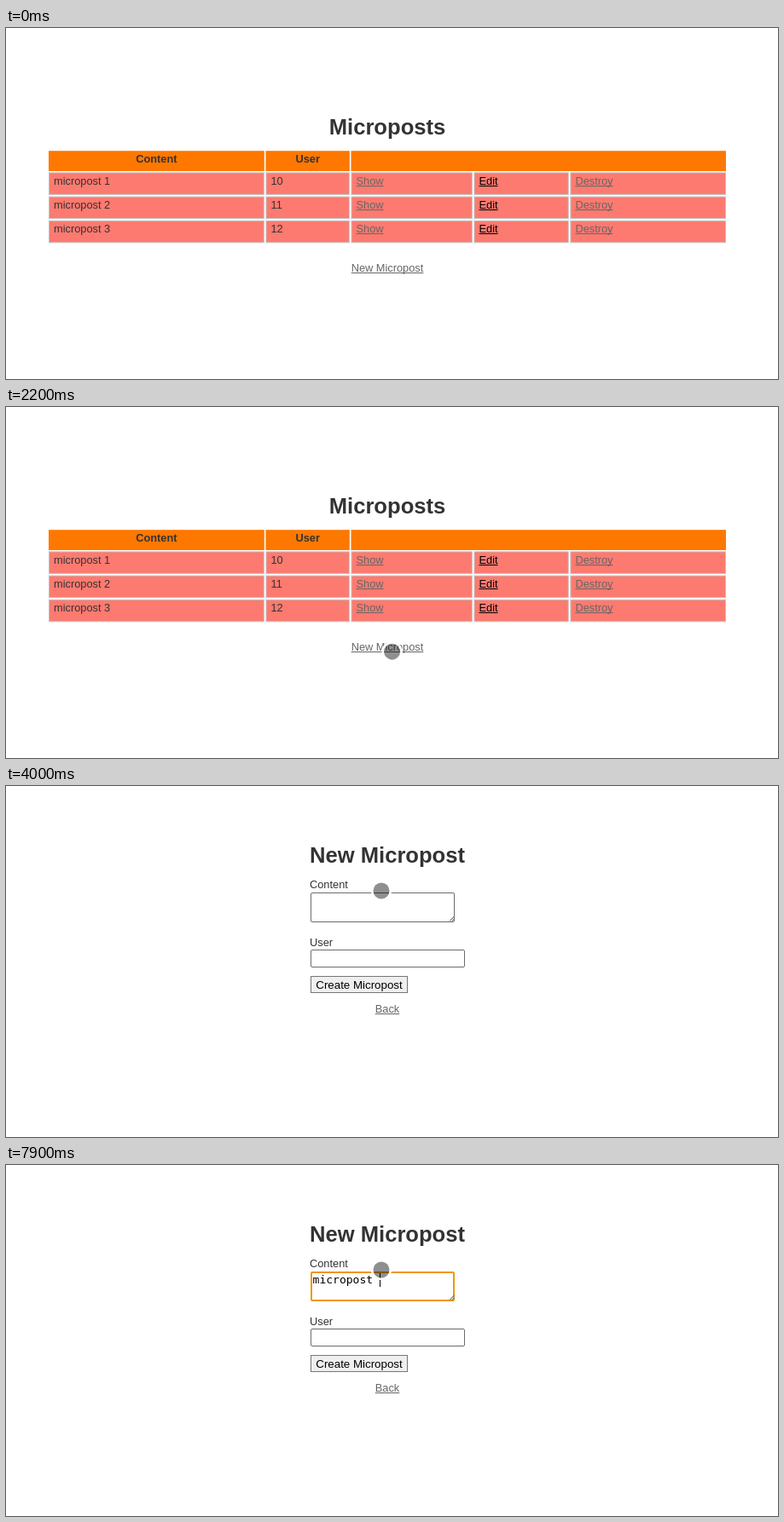
Animation, 905 px wide and 412 px high, one loop 8 s. Source, as an HTML page:

```html
<!DOCTYPE html>
<html lang="en">
<head>
<meta charset="utf-8">
<title>Microposts</title>
<style>
  html, body { margin: 0; width: 100%; height: 100%; overflow: hidden; background: #fff; }
  body { position: relative; color: #333; font: 12.8px/15px "Liberation Sans", Arial, sans-serif; }
  div, svg { position: absolute; box-sizing: border-box; white-space: pre; }
  .page, svg { left: 0; top: 0; width: 905px; height: 412px; }
  .title { left: 0; width: 894px; text-align: center; font: bold 25.6px/28px "Liberation Sans", Arial, sans-serif; }
  .head { top: 146px; font-weight: bold; text-align: center; }
  .cell { padding-left: 6px; }
  .headBox { fill: #fe7800; }
  .cellBox { fill: #fd7a70; stroke: #c4c0c0; }
  .link { color: #666; text-decoration: underline; text-decoration-skip-ink: none; }
  .edit { color: #000; }
  #newLink { left: 404.7px; top: 273px; height: 18px; padding-top: 1px; }
  #newLink.active { color: #a9d3ee; background: #06445c; }
  .field { left: 357px; border: 1px solid #6b6b6b; border-radius: 2px; background: #fff; }
  #area { top: 125px; width: 169px; height: 35px; }
  #area.focus { border: 2px solid #ee970c; }
  .grip { background: #777; height: 1px; transform: rotate(-45deg); }
  #typed { left: 359.6px; top: 127px; color: #000; font: 13px/15px "DejaVu Sans Mono", monospace; }
  #caret { top: 127px; width: 1px; height: 16px; background: #000; }
  .button { left: 357px; top: 223px; width: 114px; height: 20px; border: 1px solid #767676;
            background: #efefef; color: #000; font-size: 13.333px; line-height: 19px; text-align: center; }
  #pointer { left: -9.5px; top: -9.5px; width: 19px; height: 19px; border-radius: 50%;
             background: rgba(0, 0, 0, .44); box-shadow: 0 0 0 2.5px #fff; }
</style>
</head>
<body>
<div class="page" id="list">
  <svg id="grid"></svg>
  <div class="title" style="top:102px">Microposts</div>
  <div class="link" id="newLink">New Micropost</div>
</div>
<div class="page" id="form">
  <div class="title" style="top:67px">New Micropost</div>
  <div style="left:356px;top:108px">Content</div>
  <div class="field" id="area"></div>
  <div class="grip" style="left:518.5px;top:155px;width:8px"></div>
  <div class="grip" style="left:521.5px;top:156.5px;width:4px"></div>
  <div id="typed"></div>
  <div id="caret"></div>
  <div style="left:356px;top:176px">User</div>
  <div class="field" style="top:192px;width:181px;height:21px"></div>
  <div class="button">Create Micropost</div>
  <div class="link" style="left:432.8px;top:254px">Back</div>
</div>
<div id="pointer"></div>
<script>
const LOOP = 8000, TICK = 100, BLINK = 500;
const LINK_PRESSED = 2900, FORM_OPENED = 3000, FOCUSED = 4400;
const CHAR_WIDTH = 7.827, GAP = 1.7, ROW_PITCH = 28.2;
const $ = id => document.getElementById(id);

function addText(className, left, width, top, html) {
  const style = `left:${left}px;width:${width}px` + (top ? `;top:${top}px` : '');
  $('list').insertAdjacentHTML('beforeend', `<div class="${className}" style="${style}">${html}</div>`);
}

function addBox(className, x, y, width, height) {
  $('grid').innerHTML +=
    `<rect class="${className}" x="${x}" y="${y}" width="${width}" height="${height}"/>`;
}

const edges = [50, 304.5, 404.5, 548.5, 661.4, 844 + GAP];
const spanWidth = (from, to) => edges[to] - edges[from] - GAP;

addBox('headBox', edges[2], 144.2, spanWidth(2, 5), 23.8);
['Content', 'User'].forEach((label, i) => {
  addBox('headBox', edges[i], 144.2, spanWidth(i, i + 1), 23.8);
  addText('head', edges[i], spanWidth(i, i + 1), 0, label);
});
for (let row = 0; row < 3; row++) {
  const texts = ['micropost ' + (row + 1), 10 + row, '<span class="link">Show</span>',
    '<span class="link edit">Edit</span>', '<span class="link">Destroy</span>'];
  texts.forEach((text, i) => {
    const width = spanWidth(i, i + 1);
    addBox('cellBox', edges[i] + .5, 169.9 + row * ROW_PITCH, width - 1, ROW_PITCH - GAP - 1);
    addText('cell', edges[i], width, 172 + row * ROW_PITCH, text);
  });
}

const journeys = [
  { from: 400, to: 500, x: 250.5, y: 127.5 },
  { from: 1200, to: 1400, x: 362.5, y: 257.5 },
  { from: 1500, to: 1700, x: 446.5, y: 303.5 },
  { from: 1900, to: 2400, x: 452.5, y: 285.5 },
  { from: 3300, to: 3400, x: 444.5, y: 233.5 },
  { from: 3500, to: 4000, x: 439.5, y: 122.5 }
];
const bursts = [
  { start: 5200, pace: 100, strokes: [...'micro'] },
  { start: 6300, pace: 200, strokes: ['po', 's', 't', ' '] }
];
const easeOut = p => 1 - (1 - p) ** 3;
const show = (id, visible) => $(id).style.visibility = visible ? 'inherit' : 'hidden';

function pointerAt(t) {
  let { x, y } = journeys[0];
  for (const leg of journeys) {
    const p = easeOut(Math.min(1, Math.max(0, (t - leg.from) / (leg.to - leg.from))));
    x += (leg.x - x) * p;
    y += (leg.y - y) * p;
  }
  return { x, y };
}

function typingAt(t) {
  let text = '', lastInput = FOCUSED;
  for (const { start, pace, strokes } of bursts) {
    strokes.forEach((stroke, i) => {
      if (t < start + i * pace) return;
      text += stroke;
      lastInput = start + i * pace;
    });
  }
  return { text, caretOn: Math.floor((t - lastInput) / BLINK) % 2 === 0 };
}

function draw(t) {
  const formOpen = t >= FORM_OPENED, focused = t >= FOCUSED;
  show('list', !formOpen);
  show('form', formOpen);
  $('newLink').classList.toggle('active', t >= LINK_PRESSED);
  $('area').classList.toggle('focus', focused);

  const { text, caretOn } = typingAt(t);
  $('typed').textContent = text;
  $('caret').style.left = Math.round(359.6 + text.length * CHAR_WIDTH) + 'px';
  show('caret', focused && caretOn);

  const { x, y } = pointerAt(t);
  show('pointer', t >= journeys[0].to);
  $('pointer').style.transform = `translate(${x}px, ${y}px)`;
}

const start = performance.now();
function tick() {
  const t = (performance.now() - start) % LOOP;
  draw(Math.floor(t / TICK) * TICK);
  requestAnimationFrame(tick);
}
tick();
</script>
</body>
</html>
```
